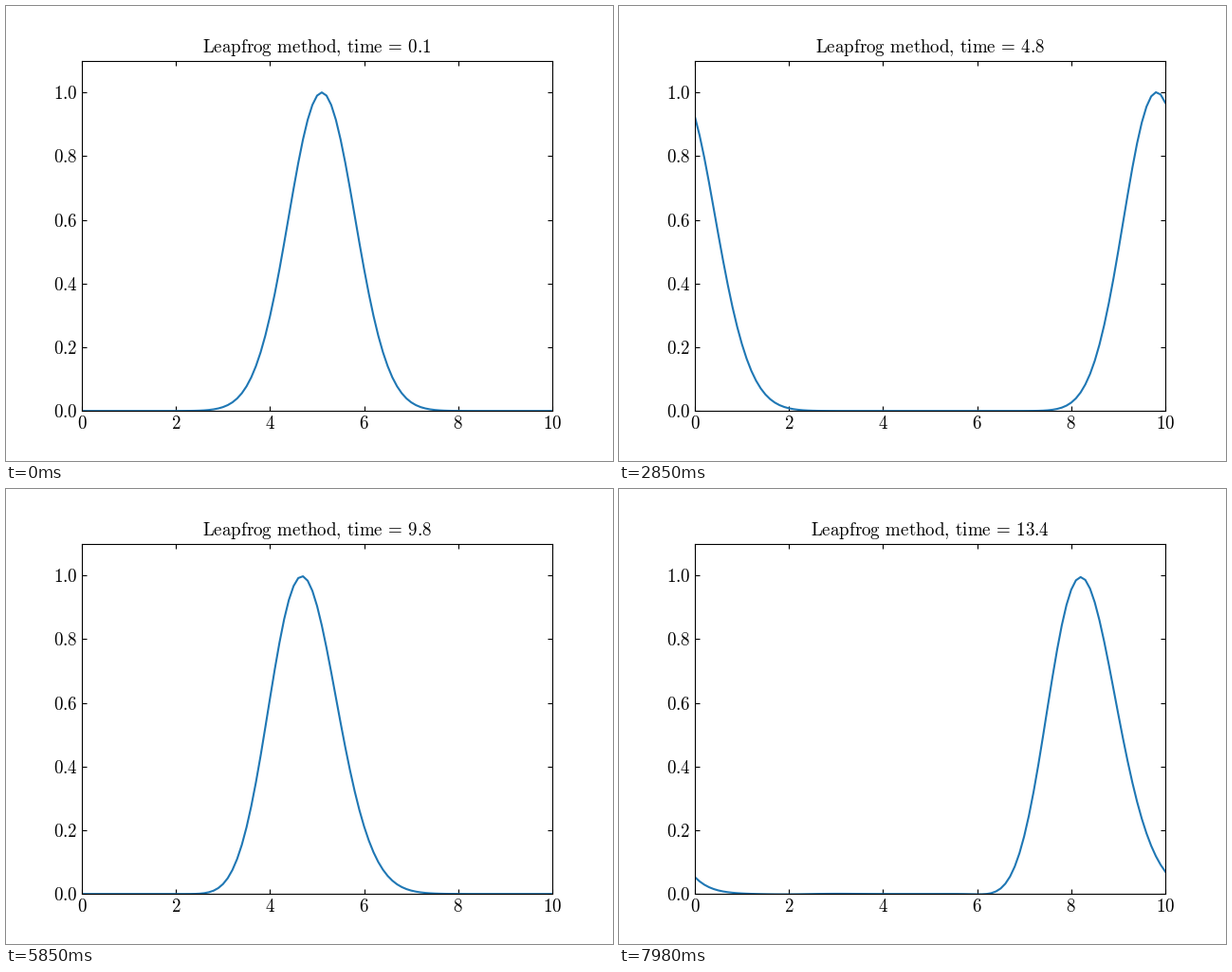
A matplotlib script that plays this animation: 640x480 px, repeating every 8000 ms.

```python
import matplotlib.pyplot as plt
import numpy as np
from matplotlib.animation import FuncAnimation

LOOP_MS = 8000
FRAMES = 267
COURANT = 0.5
DX = 0.1
DT = COURANT * DX

plt.rcParams.update({
    "font.family": "Liberation Serif",
    "mathtext.fontset": "cm",
    "font.size": 13.66,
    "axes.titlesize": 13.66,
    "xtick.direction": "in",
    "ytick.direction": "in",
    "xtick.top": True,
    "ytick.right": True,
})


def roman(text):
    """Set text in upright Computer Modern with normal word spaces."""
    text = text.replace(" = ", r"\hspace{0.18}=\hspace{0.18}")
    text = text.replace(",", "{,}").replace(" ", r"\hspace{0.38}")
    return r"$\mathrm{" + text + "}$"


def slope(u):
    """Centred difference on the periodic grid, without the 1 / (2 dx)."""
    return np.roll(u, -1) - np.roll(u, 1)


def solve(u, count):
    """Advect u with the leapfrog scheme; return (time, profile) pairs."""
    old, now = u, u - COURANT / 2 * slope(u)
    states, time = [], 0.0
    for _ in range(count):
        old, now = now, old - COURANT * slope(now)
        time += DT
        states.append((time, now))
    return states


x = np.linspace(0, 10, 101)
states = solve(np.exp(-(x - 5) ** 2), FRAMES)

fig, ax = plt.subplots(figsize=(6.4, 4.8), dpi=100)
fig.subplots_adjust(left=0.125, right=0.9, bottom=0.11, top=0.88)
ax.set(xlim=(0, 10), ylim=(0, 1.1))

x_ticks = range(0, 11, 2)
y_ticks = [k / 5 for k in range(6)]
ax.set_xticks(x_ticks, [roman(f"{v}") for v in x_ticks])
ax.set_yticks(y_ticks, [roman(f"{v:.1f}") for v in y_ticks])

line, = ax.plot(x, states[0][1], color="#1f77b4", lw=1.5)
title = ax.set_title("")


def draw(i):
    time, u = states[i]
    line.set_ydata(u)
    title.set_text(roman(f"Leapfrog method, time = {time:.1f}"))
    return line, title


anim = FuncAnimation(fig, draw, frames=FRAMES, interval=LOOP_MS / FRAMES,
                     init_func=lambda: draw(0), repeat=True, repeat_delay=0)
plt.show()
```
